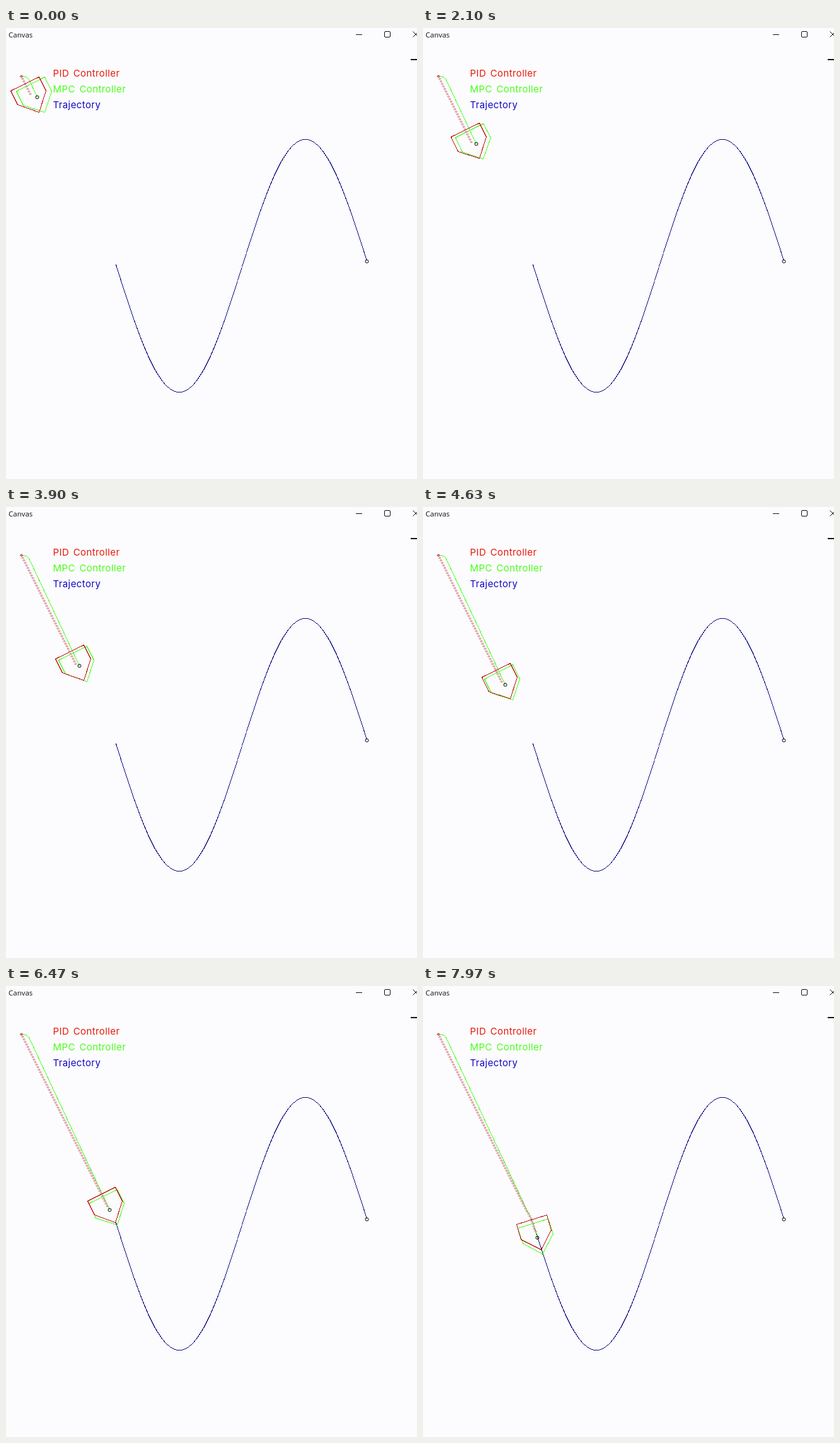
These frames come from a looping animation (652 px wide and 714 px high, 8000 ms). An HTML page:

```html
<!DOCTYPE html>
<html lang="en">
<head>
<meta charset="utf-8">
<title>Canvas</title>
<style>
  html, body { margin: 0; width: 100%; height: 100%; overflow: hidden; background: #fcfcfe; }
  svg { display: block; width: 652px; height: 714px; }
  path, circle { fill: none; stroke-width: 1; }
  .crisp { shape-rendering: crispEdges; }
  .legend { font: 400 15px Inter, "Open Sans", sans-serif; letter-spacing: .4px; word-spacing: 2px; }
  .title { font: 11.5px "Open Sans", "Noto Sans", sans-serif; }
  .ui { stroke: #111; }
  .red { stroke: #bc1010; }
  .green { stroke: #48ff18; }
  .navy { stroke: #0a0a82; }
  .black { stroke: #000; }
  #pidTrail { fill: #fcfcfe; stroke: #b42430; stroke-width: .8; }
</style>
</head>
<body>
<svg viewBox="0 0 652 714">
  <text class="title" x="4" y="15" fill="#111">Canvas</text>
  <path class="ui" d="M555 10.5H565M645.5 5.5L654.5 14.5M654.5 5.5L645.5 14.5"/>
  <rect class="ui" x="600.5" y="5.5" width="9" height="9" rx="1.5" fill="none"/>
  <rect x="642" y="49" width="10" height="2" fill="#111"/>

  <g class="legend">
    <text x="74.5" y="77" fill="#e81808">PID Controller</text>
    <text x="74.5" y="102" fill="#48ff18">MPC Controller</text>
    <text x="74.5" y="127" fill="#1408c4">Trajectory</text>
  </g>

  <path id="curve" class="crisp navy"/>
  <circle class="black" cx="572.5" cy="369.5" r="2.5"/>
  <path id="mpcTrail" class="crisp green"/>
  <path id="mpcBody" class="crisp green"/>
  <path id="pidTrail"/>
  <circle cx="24.5" cy="76.5" r="1.5" class="red"/>
  <path id="pidBody" class="crisp red"/>
  <circle id="marker" class="black" r="2.5"/>
</svg>
<script>
const LOOP = 8000;
const $ = id => document.getElementById(id);
const lerp = (a, b, p) => a + (b - a) * p;
const ramp = (t, from, to) => Math.min(1, Math.max(0, (t - from) / (to - from)));

// Each route runs straight to the curve, then follows its first slope.
const mpc = { start: [36, 81], bend: [174, 375] };
const pid = { start: [23.5, 76], bend: [172.3, 371.5] };

// Height reached at a time; equal heights are pauses.
const pace = [[70, 109], [3130, 220], [4630, 281], [6730, 364], [6870, 364], [7100, 374], [7230, 374], [7970, 398]];

function height(t) {
  let y = pace[0][1];
  for (let i = 1; i < pace.length; i++) {
    y += (pace[i][1] - pace[i - 1][1]) * ramp(t, pace[i - 1][0], pace[i][0]);
  }
  return y;
}

function at({ start, bend }, y) {
  if (y > bend[1]) return [bend[0] + (y - bend[1]) / Math.PI, y];
  return [lerp(start[0], bend[0], (y - start[1]) / (bend[1] - start[1])), y];
}

function travelled(route, y) {
  return [route.start, ...(y > route.bend[1] ? [route.bend] : []), at(route, y)];
}

const pixel = v => Math.round(v) + 0.5;
const line = points => "M" + points.map(p => pixel(p[0]) + " " + pixel(p[1])).join("L");

// A 50 px wide box with a pointed nose: back corners, shoulders, nose.
const hull = [[-25, -25], [-25, 25], [0, 25], [25, 0], [0, -25]];

function body([x, y], degrees) {
  const a = degrees * Math.PI / 180, c = Math.cos(a), s = Math.sin(a);
  return line(hull.map(([f, r]) => [x + f * c + r * s, y + f * s - r * c])) + "Z";
}

function beads(route, end) {
  let d = "";
  for (let y = route.start[1]; y < end; y += 4) {
    const [x] = at(route, y);
    d += `M${pixel(x) - 1.5} ${pixel(y)}l1.5 -1.5 1.5 1.5 -1.5 1.5z`;
  }
  return d;
}

const wave = [];
for (let x = 174; x <= 572; x++) {
  wave.push([x, 376 + 200 * Math.sin((x - 174.5) * Math.PI / 200)]);
}
$("curve").setAttribute("d", line(wave));

function draw() {
  const t = performance.now() % LOOP;
  const y = height(t);
  const pidY = y + 1.2 - 0.09 * (t / 1000) ** 2;
  const heading = lerp(63.4, 72.6, ramp(t, 6870, 7100));
  const [mx, my] = at(mpc, y);

  $("mpcTrail").setAttribute("d", line([[24, 76], [32, 77], ...travelled(mpc, y)]));
  $("mpcBody").setAttribute("d", body([mx + 0.5, my + 1.8], heading));
  $("pidTrail").setAttribute("d", beads(pid, pidY - 3));
  $("pidBody").setAttribute("d", body(at(pid, pidY), heading));
  $("marker").setAttribute("cx", pixel(mx));
  $("marker").setAttribute("cy", pixel(my));
  requestAnimationFrame(draw);
}
draw();
</script>
</body>
</html>
```
